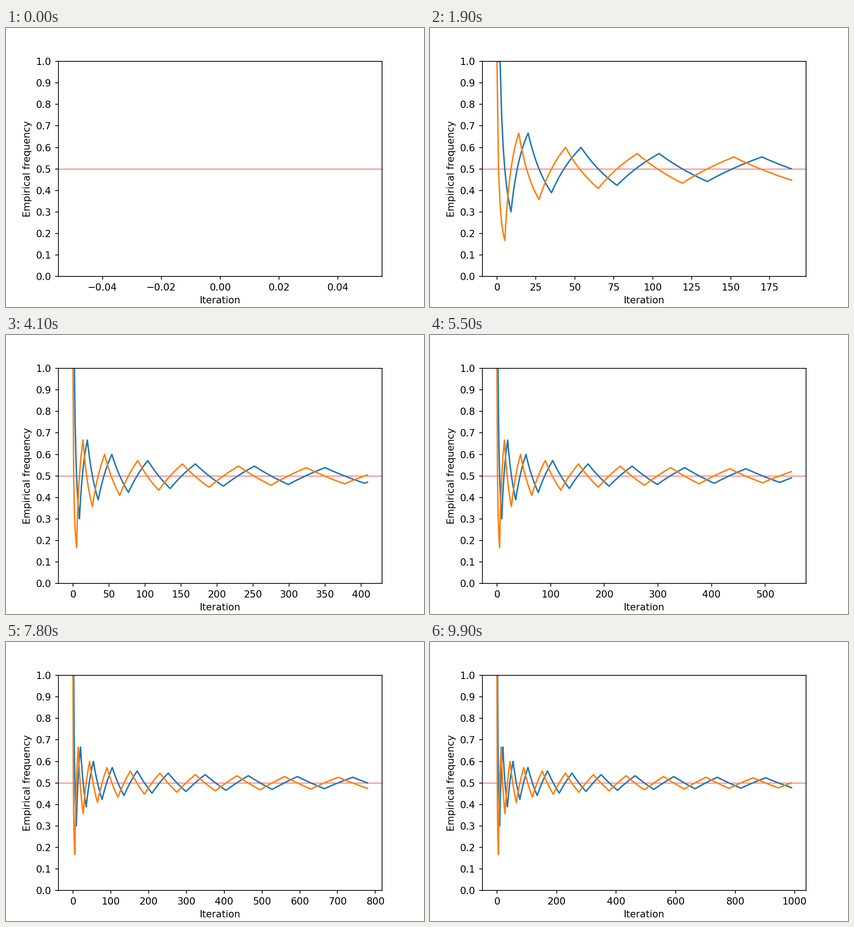
Recreate the animation shown at these times as a matplotlib script. Size 917 by 611 pixels, loop 10000 ms.

```python
import numpy as np
import matplotlib.pyplot as plt
from matplotlib.animation import FuncAnimation

W, H, DPI = 917, 611, 152.75
FRAMES, INTERVAL, STEP = 100, 100, 10


def fictitious_play(n):
    """Empirical frequencies of two players best-responding in matching pennies."""
    freq = np.ones((2, n))
    a = b = 1
    for t in range(1, n):
        # One player matches, the other mismatches; both stay put on a tie.
        play_a, play_b = 2 * b >= t, 2 * a <= t
        a += play_a
        b += play_b
        freq[:, t] = a / (t + 1), b / (t + 1)
    return freq


freq = fictitious_play(FRAMES * STEP)

plt.rcParams["font.family"] = "DejaVu Sans"
fig, ax = plt.subplots(figsize=(W / DPI, H / DPI), dpi=DPI)
fig.subplots_adjust(left=0.125, right=0.9, bottom=0.11, top=0.88)
ax.axhline(0.5, color="red", lw=1, alpha=0.5)
lines = [ax.plot([], [], color=c, lw=1.5)[0] for c in ("tab:blue", "tab:orange")]
ax.set_ylim(0, 1)
ax.set_yticks(np.arange(11) / 10)
ax.set_xlabel("Iteration")
ax.set_ylabel("Empirical frequency")


def update(i):
    n = i * STEP
    for line, f in zip(lines, freq):
        line.set_data(np.arange(n), f[:n])
    if n:
        pad = 0.05 * (n - 1)
        ax.set_xlim(-pad, n - 1 + pad)
    else:
        ax.set_xlim(-0.055, 0.055)
    return lines


anim = FuncAnimation(fig, update, frames=FRAMES, init_func=lambda: update(0),
                     interval=INTERVAL, repeat=True, repeat_delay=0)
plt.show()
```
